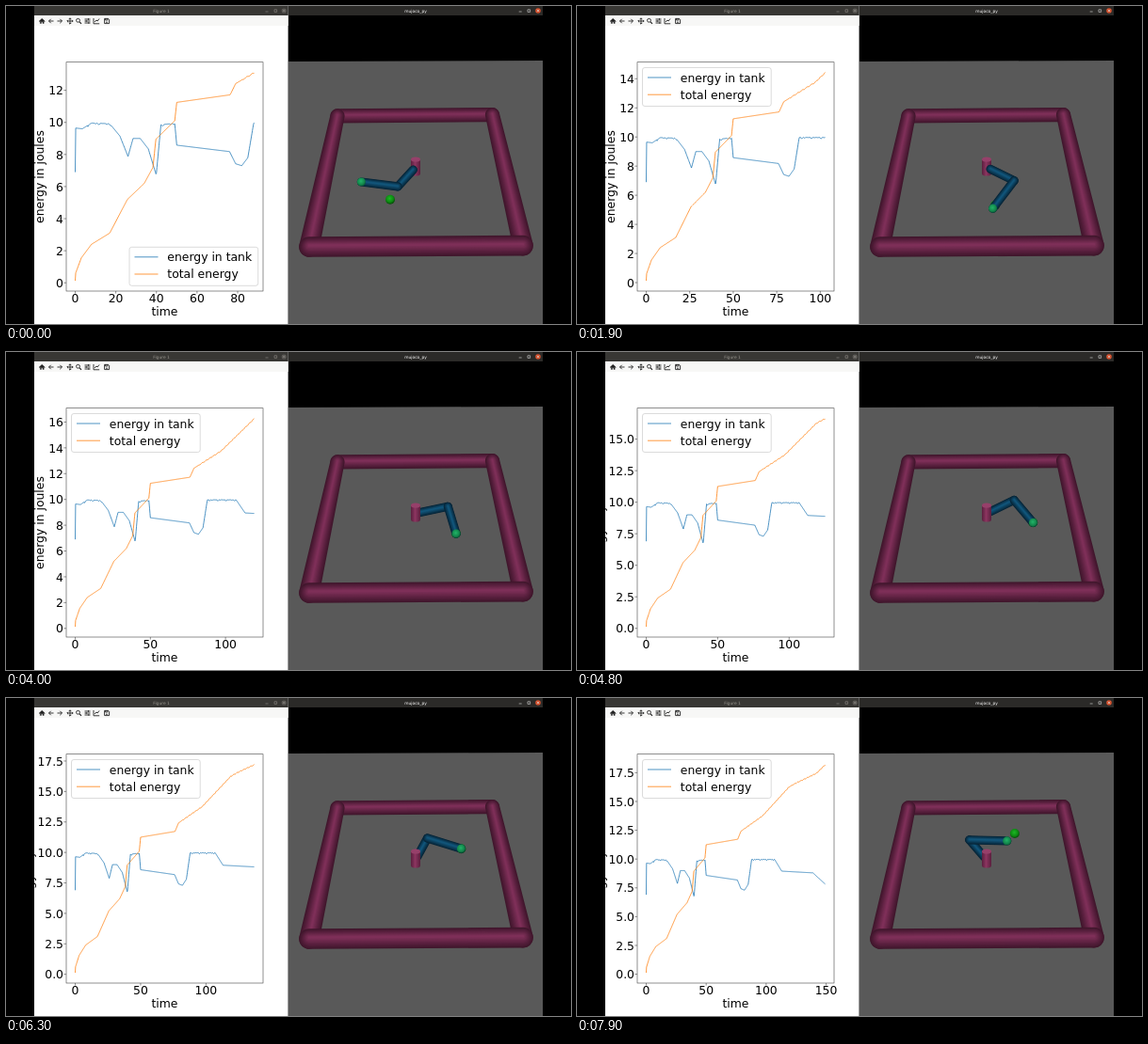
Write an HTML page that moves like this. It is 600 by 338 pixels and loops after 8 s.

```html
<!DOCTYPE html>
<html lang="en">
<head>
<meta charset="utf-8">
<title>Energy tank</title>
<style>
  html, body { margin: 0; width: 100%; height: 100%; overflow: hidden; background: #000; }
  svg { display: block; width: 100vw; height: 100vh; }
  .plot text { font: 12.4px "DejaVu Sans", Verdana, sans-serif; fill: #000; }
  .bar { font: 4.4px "DejaVu Sans", sans-serif; text-anchor: middle; }
  .icons { fill: none; stroke: #222; stroke-width: .9; }
  .curve { fill: none; stroke-width: .8; stroke-linejoin: round; }
</style>
</head>
<body>
<svg viewBox="0 0 600 338">
  <defs>
    <linearGradient id="post">
      <stop offset="0" stop-color="#5a1f3e"/><stop offset=".45" stop-color="#8c3560"/><stop offset="1" stop-color="#5a1f3e"/>
    </linearGradient>
    <radialGradient id="ball" cx=".45" cy=".38" r=".6">
      <stop offset="0" stop-color="#1cb824"/><stop offset=".65" stop-color="#0d8a12"/><stop offset="1" stop-color="#064e08"/>
    </radialGradient>
    <radialGradient id="tipFill" cx=".45" cy=".4" r=".6">
      <stop offset="0" stop-color="#22b468"/><stop offset=".7" stop-color="#12844a"/><stop offset="1" stop-color="#095234"/>
    </radialGradient>
  </defs>
  <rect width="600" height="338" fill="#000"/>

  <g class="plot">
    <rect x="30" width="269.6" height="338" fill="#fff"/>
    <g id="ticks" stroke="none"></g>
    <path id="tankLine" class="curve" stroke="#1f77b4"/>
    <path id="totalLine" class="curve" stroke="#ff7f0e"/>
    <rect x="64" y="59.7" width="209" height="243.3" fill="none" stroke="#444" stroke-width=".6"/>
    <text x="168.5" y="329" text-anchor="middle">time</text>
    <text id="yLabel" text-anchor="middle">energy in joules</text>
    <g id="legend">
      <rect width="136.7" height="41" rx="2.5" fill="#fff" fill-opacity=".8" stroke="#ccc" stroke-width=".7"/>
      <path class="curve" d="M5.5 10.5h25" stroke="#1f77b4"/>
      <path class="curve" d="M5.5 28.7h25" stroke="#ff7f0e"/>
      <text x="40.3" y="15">energy in tank</text>
      <text x="40.3" y="33.2">total energy</text>
    </g>
  </g>

  <rect x="30" y="10" width="269.6" height="11" fill="#f7f7f6"/>
  <g class="icons">
    <path d="M35 16.3l3.2-3 3.2 3z M36.3 16v2.5h1.2v-1.6h1.5v1.6h1.2V16" fill="#222" stroke-width=".4"/>
    <path d="M50.5 16h-5m2.2-2.2L45.5 16l2.2 2.2M54.5 16h5m-2.2-2.2l2.2 2.2-2.2 2.2"/>
    <path d="M65 16h6M68 13v6M66.8 14l1.2-1.2 1.2 1.2M66.8 18l1.2 1.2 1.2-1.2M66 14.8L64.8 16l1.2 1.2M70 14.8l1.2 1.2-1.2 1.2"/>
    <circle cx="76.5" cy="15.3" r="1.9"/><path d="M78 16.8l2 2" stroke-width="1.2"/>
    <path d="M83.5 14h6M83.5 16h6M83.5 18h6M87.5 13.2v1.6M85.2 15.2v1.6M87.8 17.2v1.6"/>
    <path d="M93 13v5.8h6.2M94.2 17l1.8-2 1.2 1 1.8-2.5"/>
    <path d="M104.6 13.4h4l1 1v4.2h-5zM105.6 13.4v1.6h2.4v-1.6M106 17.2h2"/>
  </g>

  <rect x="30" width="269.6" height="10" fill="#383734"/>
  <text class="bar" x="165" y="6.8" fill="#99968f">Figure 1</text>
  <circle cx="295.2" cy="5" r="2.6" fill="#5a5854"/>
  <path d="M275.5 6h3M285 3.8h2.6v2.6h-2.6zM294 3.8l2.4 2.4m0-2.4L294 6.2" fill="none" stroke="#8f8c86" stroke-width=".6"/>

  <path d="M300 59L570 58V338H300z" fill="#595959"/>
  <rect x="300" width="270" height="10" fill="#2b2a28"/>
  <text class="bar" x="435" y="6.8" fill="#fff" font-weight="bold">mujoco_py</text>
  <circle cx="565" cy="5" r="2.8" fill="#d4502c"/>
  <path d="M544.7 6h3M554 3.8h2.6v2.6H554zM563.8 3.8l2.4 2.4m0-2.4l-2.4 2.4" fill="none" stroke="#ddd" stroke-width=".6"/>

  <g id="walls"></g>
  <g id="robot"></g>
  <rect width="30" height="338" fill="#000"/>
</svg>

<script>
const LOOP = 8000, STEP = 100;
const el = id => document.getElementById(id);

// Bends of the two curves as [time, joules]
const totalBends = [[0, .13], [.2, .6], [3, 1.55], [8, 2.4], [17, 3.1], [25.7, 5.2], [34, 6.2], [38.3, 7.2],
  [39.7, 8.95], [49, 10.1], [50, 11.25], [76.3, 11.72], [79, 12.42], [97, 13.75], [119, 16.25], [124, 16.55],
  [142, 17.45], [150, 18.27]];
const tankBends = [[0, 6.9], [.2, 9.65], [3.5, 9.6], [8, 9.96], [17, 9.92], [22, 9.15], [26, 7.88], [28.5, 9],
  [32, 9], [36, 8.35], [39.9, 6.72], [42.2, 9.85], [49, 9.95], [50, 8.58], [76, 8.18], [79, 7.42], [82, 7.3],
  [85, 7.8], [87.9, 9.97], [107, 9.97], [113, 8.95], [139, 8.8], [150, 7.75]];

function along(bends, t) {
  const i = Math.max(1, bends.findIndex(b => b[0] >= t));
  const [t0, v0] = bends[i - 1], [t1, v1] = bends[i];
  return v0 + (v1 - v0) * (t - t0) / (t1 - t0);
}
const totalAt = t => along(totalBends, t) + .03 * Math.sin(t * 2.4) * (t > 82);
function tankAt(t) {
  const v = along(tankBends, t);
  return v > 9.8 ? v - .09 * Math.max(0, Math.sin(t * 2.3) * Math.sin(t * 1.1 + 1)) : v;
}

function niceStep(range, bins) {
  const raw = range / bins, p = 10 ** Math.floor(Math.log10(raw));
  return p * [1, 2, 2.5, 5, 10].find(s => s * p >= raw);
}

function drawPlot(ms) {
  const end = 88.1 + 7.73 * ms / 1000, low = .13, range = along(totalBends, end) - low;
  const X = t => 73.5 + t * 190 / end;
  const Y = v => 292 - (v - low) * 221 / range;
  const path = f => {
    let d = "";
    for (let t = 0; t < end; t += .25) d += `${d ? "L" : "M"}${X(t).toFixed(2)} ${Y(f(t)).toFixed(2)}`;
    return `${d}L${X(end)} ${Y(f(end))}`;
  };
  el("tankLine").setAttribute("d", path(tankAt));
  el("totalLine").setAttribute("d", path(totalAt));

  const xStep = niceStep(range && end * 1.1, 5), yStep = niceStep(range * 1.1, 9), decimals = yStep % 1 ? 1 : 0;
  const mark = (d, x, y, anchor, label) => `<path d="${d}" stroke="#444" stroke-width=".6"/>`
    + `<text x="${x}" y="${y}" text-anchor="${anchor}">${label}</text>`;
  let marks = "";
  for (let t = 0; t <= end * 1.05; t += xStep)
    marks += mark(`M${X(t)} 303v2.6`, X(t), 315.3, "middle", t);
  for (let v = 0; v <= low + range * 1.05; v += yStep)
    marks += mark(`M64 ${Y(v)}h-2.6`, 61, Y(v) + 4.7, "end", v.toFixed(decimals));
  el("ticks").innerHTML = marks;
  el("yLabel").setAttribute("transform", `translate(${decimals ? 28.5 : 40.3} 181.5) rotate(-90)`);
  el("legend").setAttribute("transform", Y(11.42) > 106.5 ? "translate(69.5 65.5)" : "translate(131 256.3)");
}

// Tapered rod with round ends, shaded by nested layers from rim to core
function rod([x1, y1, r1], [x2, y2, r2], rim, core) {
  const len = Math.hypot(x2 - x1, y2 - y1) || 1, nx = (y1 - y2) / len, ny = (x2 - x1) / len;
  const layers = 9;
  let out = "";
  for (let i = 0; i < layers; i++) {
    const k = 1 - i / layers, a = r1 * k, b = r2 * k, lift = .15 * (1 - k) * r1;
    const rgb = rim.map((c, j) => Math.round(c + (core[j] - c) * (1 - k)));
    out += `<path fill="rgb(${rgb})" transform="translate(0 ${-lift})"
      d="M${x1 + nx * a} ${y1 + ny * a}L${x2 + nx * b} ${y2 + ny * b}A${b} ${b} 0 0 0 ${x2 - nx * b} ${y2 - ny * b}
      L${x1 - nx * a} ${y1 - ny * a}A${a} ${a} 0 0 0 ${x1 + nx * a} ${y1 + ny * a}Z"/>`;
  }
  return out;
}

function drawWalls() {
  const tl = [352, 116.8, 7.6], tr = [516.5, 115.6, 7.6], br = [549, 254.6, 10.8], bl = [322, 256, 10.8];
  el("walls").innerHTML = [[tl, tr], [tl, bl], [tr, br], [bl, br]]
    .map(([a, b]) => rod(a, b, [64, 22, 44], [134, 50, 94])).join("");
}

const BASE = { x: 435, y: 171.5 }, UPPER = 36, LOWER = 40, ORBIT = 51;
const post = `<path d="M430 163V178a5 2.6 0 0 0 10 0V163z" fill="url(#post)"/>
  <ellipse cx="435" cy="163.1" rx="5" ry="2.6" fill="#96406a"/>`;

// Angle at the base or the tip of the triangle made by both links and the orbit radius
const corner = (a, opposite) => Math.acos((a * a + ORBIT * ORBIT - opposite * opposite) / (2 * a * ORBIT));
const project = (gx, gy) => [BASE.x + gx, BASE.y + .725 * gy + .0015 * gy * gy];

// The arm catches up with the circling ball, follows it, then starts to fold away
function drawRobot(ms) {
  const s = ms / 1000, rad = Math.PI / 180;
  const goal = (122 - 22.3 * s) * rad, fold = Math.max(0, (s - 7) / .9) ** 2;
  const upper = goal - corner(UPPER, LOWER) + (51 * Math.exp(-s) - 15 * fold) * rad;
  const lower = goal + corner(LOWER, UPPER) + (28 * Math.exp(-s / .3) + 13 * fold) * rad;
  const ux = Math.cos(upper), uy = Math.sin(upper);

  const ball = project(ORBIT * Math.cos(goal), ORBIT * Math.sin(goal));
  const elbow = [BASE.x + UPPER * ux, BASE.y + 24 * uy];
  const tip = project(UPPER * ux + LOWER * Math.cos(lower), UPPER * uy + LOWER * Math.sin(lower));
  const link = (a, b) => rod([...a, 4.6], [...b, 4.6], [6, 36, 54], [20, 92, 132]);
  const sphere = ([x, y], r, fill) => `<circle cx="${x}" cy="${y}" r="${r}" fill="url(#${fill})"/>`;

  const upperLink = link([BASE.x + 5 * ux, BASE.y + 3 * uy], elbow);
  el("robot").innerHTML = sphere(ball, 5, "ball")
    + (uy > .3 ? post + upperLink : upperLink + post)
    + link(elbow, tip) + sphere(tip, 4.6, "tipFill");
}

let shown = -1;
function frame(now) {
  const ms = Math.floor(now % LOOP / STEP) * STEP;
  if (ms !== shown) {
    drawPlot(ms);
    drawRobot(ms);
    shown = ms;
  }
  requestAnimationFrame(frame);
}
drawWalls();
frame(performance.now());
</script>
</body>
</html>
```
